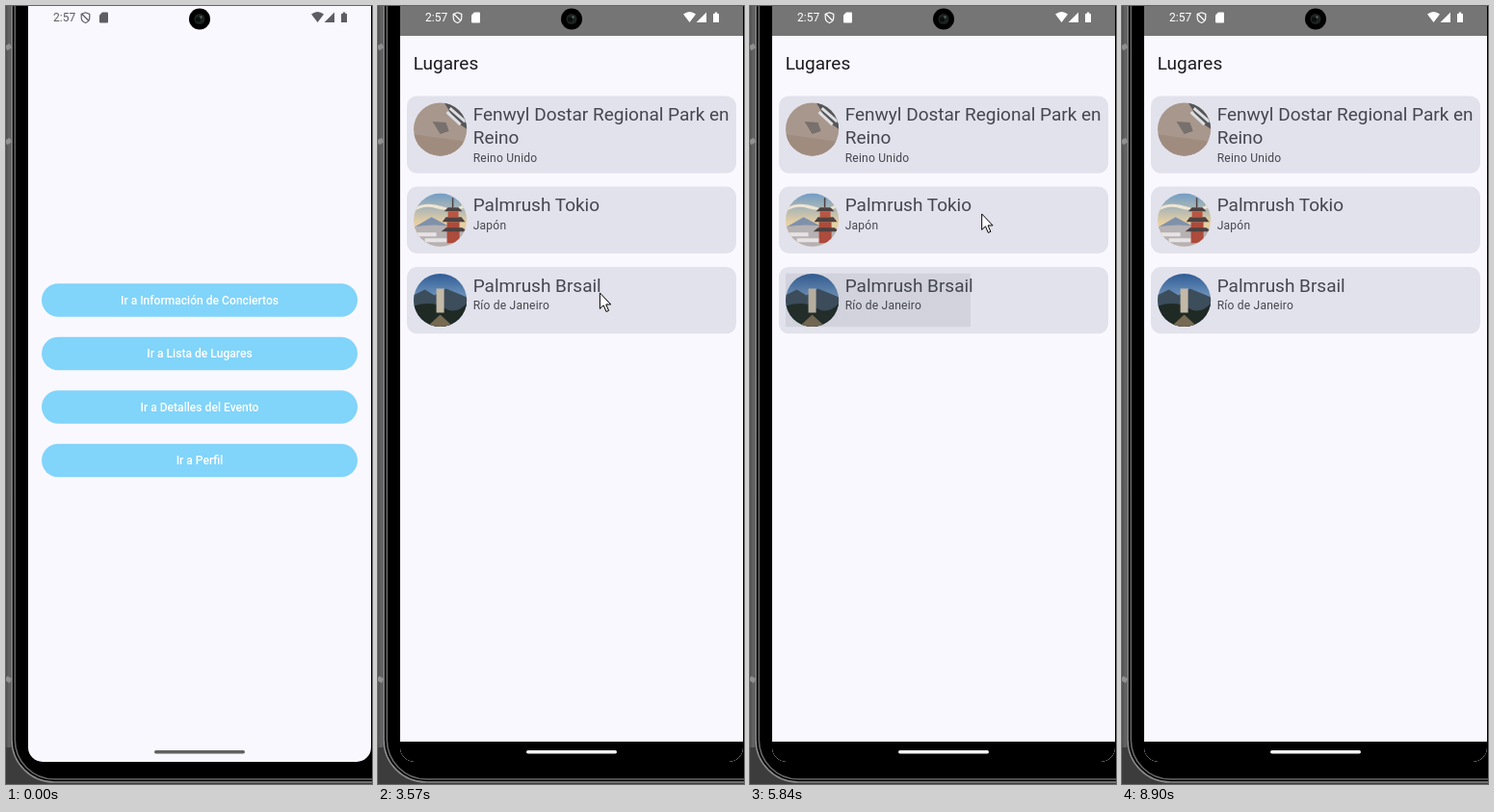
An HTML page for the animation above (9830 ms loop, 380 by 808 pixels).

```html
<!DOCTYPE html>
<html lang="es">
<head>
<meta charset="utf-8">
<style>
  html, body { margin: 0; width: 100%; height: 100%; overflow: hidden; background: #000; }
  svg { display: block; width: 380px; height: 808px; font-family: Roboto, sans-serif; font-size: 12.08px; }
  .title { font-size: 19px; }
  .sub { letter-spacing: .2px; }
  .label { font-weight: 500; fill: #fff; text-anchor: middle; }
</style>
</head>
<body>
<svg viewBox="0 0 380 808">
  <defs>
    <clipPath id="screen"><rect x="23" y="-30" width="356" height="815" rx="15"/></clipPath>
    <clipPath id="disc"><circle r="27.6"/></clipPath>
    <clipPath id="area0"><rect x="37" y="343.7" width="328" height="34.5" rx="17.25"/></clipPath>
    <clipPath id="area1"><rect x="37" y="100.3" width="326" height="67"/></clipPath>
    <clipPath id="area2"><rect x="37" y="194.5" width="192" height="55.5"/></clipPath>
    <clipPath id="area3"><rect x="37" y="277.8" width="192" height="55.5"/></clipPath>
    <radialGradient id="light"><stop offset=".55" stop-color="#fff" stop-opacity=".13"/><stop offset="1" stop-color="#fff" stop-opacity="0"/></radialGradient>
    <radialGradient id="dark"><stop offset=".55" stop-color="#3c4650" stop-opacity=".1"/><stop offset="1" stop-color="#3c4650" stop-opacity="0"/></radialGradient>
    <linearGradient id="metal"><stop stop-color="#505050"/><stop offset=".6" stop-color="#666"/><stop offset="1" stop-color="#444"/></linearGradient>
    <linearGradient id="dusk" x2="0" y2="1"><stop stop-color="#6f9cc6"/><stop offset=".55" stop-color="#e6cfa4"/></linearGradient>
    <linearGradient id="sky" x2="0" y2="1"><stop stop-color="#2f5c96"/><stop offset=".6" stop-color="#86a8c9"/></linearGradient>
  </defs>

  <!-- phone body -->
  <rect width="380" height="808" fill="#3c3c3c"/>
  <rect width="6" height="770" fill="url(#metal)"/>
  <g fill="none">
    <rect x="6" y="-60" width="450" height="866" rx="44" fill="#000" stroke="#8a8a8a" stroke-width="1.6"/>
    <rect x="9.3" y="-60" width="450" height="863" rx="41" stroke="#666" stroke-width="1.6"/>
    <path d="M0 44l5-3M0 142l5-3M0 698l5 3" stroke="#909090" stroke-width="5"/>
  </g>

  <g clip-path="url(#screen)">
    <rect x="23" y="-30" width="356" height="815" fill="#faf8ff"/>
    <g id="home"></g>
    <g id="places">
      <rect x="-40" width="460" height="785" fill="#faf8ff"/>
      <rect x="-40" width="460" height="31" fill="#757575"/>
      <rect x="-40" y="764" width="460" height="21"/>
      <text class="title" x="36.8" y="65.7" fill="#1a1b21">Lugares</text>
    </g>
  </g>

  <g id="bar" fill="currentColor">
    <text x="49" y="16.3">2:57</text>
    <path d="M82.5 6.8l4.3 1.7v3.2c0 2.800-1.800 4.900-4.300 5.800-2.500-.9-4.300-3-4.300-5.800V8.500zM79 8.500l7 7" fill="none" stroke="currentColor" stroke-width="1.2"/>
    <path d="M100 6.500h5q1 0 1 1v9q0 1-1 1h-7q-1 0-1-1v-7z"/>
    <path d="M317 8.600q6.500-5 13 0l-6.500 8.400zM341 6.500v10.500h-10.500zM348 8h1.700v-1.500h2.600V8h1.700v9h-6z"/>
    <rect id="pill" x="154" y="773" width="94" height="3.400" rx="1.700"/>
  </g>
  <circle cx="201" cy="13.500" r="11"/>
  <circle cx="201" cy="13.500" r="5.500" fill="#1d2322"/>
  <circle cx="199.500" cy="14" r="2.500" fill="#0b0e0e"/>
  <circle cx="202.500" cy="11.500" r="1.200" fill="#56645c"/>

  <g id="cursor">
    <circle id="press" r="15" fill="#f3f25c" opacity=".87"/>
    <path d="M.5 .5v16.500l3.800-3.600 2.800 6.600 2.600-1.100-2.800-6.400h5z" fill="#fff" stroke="#000"/>
  </g>
</svg>

<script>
const LOOP = 9830, STEP = 66.55, FIRST = 440;
const $ = id => document.getElementById(id);
const add = (parent, markup) => parent.insertAdjacentHTML('beforeend', markup);

['Información de Conciertos', 'Lista de Lugares', 'Detalles del Evento', 'Perfil'].forEach((name, i) => {
  const y = 288.2 + 55.5 * i;
  add($('home'), `<rect x="37" y="${y}" width="328" height="34.5" rx="17.25" fill="#81d4fa"/>
    <text class="label" x="201" y="${y + 21.4}">Ir a ${name}</text>`);
});

const photos = [
  `<path d="M-28-28h56v56h-56z" fill="#a8978c"/><path d="M-28 5l56 8v15h-56z" fill="#a08c7f"/>
   <path d="M-8-8L6-7 9 2 0 5z" fill="#77706d"/><path d="M4-28h24V0L16-8z" fill="#55565a"/>
   <path d="M10-22l16 14M7-18l14 13" stroke="#dedfe2" stroke-width="3"/>`,
  `<path d="M-28-28h56v56h-56z" fill="url(#dusk)"/><path d="M-28-12q14-8 30-2t26-6v7q-18 5-32 1t-24 4z" fill="#eee5d5"/>
   <path d="M-28 8L-9-3 12 8z" fill="#7f91aa"/><path d="M-28 7q28-4 56 2v19h-56z" fill="#b6b1b3"/>
   <path d="M-24 15h20M-16 21h25" stroke="#e7e3e4" stroke-width="4"/>
   <path d="M7 2h13v22H7z" fill="#ad4b3c"/><path d="M2 2l4-5h16l4 5zM4-9l4-4h11l4 4zM1 12l5-4h17l5 4z" fill="#4d4140"/>
   <path d="M8-9h11v6H8z" fill="#b95541"/><path d="M13-23v10" stroke="#4d4140" stroke-width="1.500"/>`,
  `<path d="M-28-28h56v56h-56z" fill="url(#sky)"/><path d="M-28-5l12-6 10 6 12-7 22 9v31h-56z" fill="#3c4d5c"/>
   <path d="M-28 6q20-6 32 2t24-5v25h-56z" fill="#202a25"/><path d="M-14 28l14-13 14 13z" fill="#776a52"/>
   <rect x="-4" y="-12" width="8" height="25" fill="#c3b9a7"/>`
];
const cards = [
  [93.5, 80.3, ['Fenwyl Dostar Regional Park en', 'Reino'], 'Reino Unido'],
  [187.6, 69.3, ['Palmrush Tokio'], 'Japón'],
  [270.9, 69.3, ['Palmrush Brsail'], 'Río de Janeiro']
];
cards.forEach(([y, h, lines, sub], i) => {
  const titles = lines.map((s, n) => `<text class="title" x="98.7" y="${y + 25.7 + 24.15 * n}">${s}</text>`).join('');
  add($('places'), `<g fill="#45464f"><rect x="30" y="${y}" width="342" height="${h}" rx="10.35" fill="#e2e2ec"/>
    <g transform="translate(64.6 ${y + 34.6})" clip-path="url(#disc)">${photos[i]}</g>
    ${titles}<text class="sub" x="98.7" y="${y + 20 + 24.15 * lines.length}">${sub}</text></g>`);
});

// [start, end, area, x, y]
const ripples = [
  [1600, 2300, 0, 234, 366], [3990, 4500, 1, 190, 126], [4640, 5300, 2, 205, 230],
  [5160, 5990, 3, 200, 314], [5900, 6220, 2, 242, 211], [6700, 7350, 1, 262, 133]
].map(([start, end, area, x, y]) => {
  const page = area ? $('places') : $('home');
  add(page, `<g clip-path="url(#area${area})"><circle cx="${x}" cy="${y}" fill="url(#${area ? 'dark' : 'light'})"/></g>`);
  return { start, end, dot: page.lastElementChild.firstElementChild };
});

// [time, x, y]
const path = [
  [440, 355, 486], [706, 254, 395], [905, 254, 395], [1370, 234, 366], [2600, 234, 366], [2890, 232, 451],
  [3365, 225, 322], [3505, 225, 322], [3567, 230, 298], [3833, 190, 126], [4250, 190, 126], [4540, 205, 230],
  [4720, 205, 230], [4900, 204, 284], [5030, 200, 314], [5400, 200, 314], [5850, 242, 211], [6300, 242, 211],
  [6425, 267, 131], [7150, 267, 131], [7490, 275, 600], [7565, 275, 600], [7830, 360, 763], [8095, 360, 763],
  [8290, 315, 730], [8700, 315, 730], [8840, 365, 771]
];
const presses = [[1560, 1700], [2860, 3360], [3960, 4090], [4560, 4690], [5020, 5160], [5960, 6090], [6560, 6690], [8280, 8350]];

const clamp = v => Math.max(0, Math.min(1, v));
const bezier = (a, b, c, d, u) => {
  const v = 1 - u;
  return a * v * v * v + 3 * b * v * v * u + 3 * c * v * u * u + d * u * u * u;
};

// Two joined curves: quick start, very slow end.
function slideEase(x) {
  const [xs, ys] = x < 1 / 6
    ? [[0, .05, .1333, 1 / 6], [0, 0, .06, .4]]
    : [[1 / 6, .2083, .25, 1], [.4, .82, 1, 1]];
  let lo = 0, hi = 1;
  for (let i = 0; i < 20; i++) {
    const mid = (lo + hi) / 2;
    if (bezier(...xs, mid) < x) lo = mid; else hi = mid;
  }
  return bezier(...ys, lo);
}

function cursorAt(t) {
  const i = path.findIndex(p => p[0] > t);
  if (i < 0) return path[path.length - 1].slice(1);
  if (!i) return path[0].slice(1);
  const [t0, x0, y0] = path[i - 1], [t1, x1, y1] = path[i];
  const k = (t - t0) / (t1 - t0);
  return [x0 + (x1 - x0) * k, y0 + (y1 - y0) * k];
}

function draw(now) {
  const t = FIRST + Math.floor((now % LOOP - FIRST) / STEP) * STEP;

  const slide = slideEase(clamp((t - 2235) / 450));
  $('home').setAttribute('transform', `translate(${-35.5 * slide})`);
  $('places').setAttribute('transform', `translate(${35.5 * (1 - slide)})`);
  $('places').setAttribute('opacity', clamp((t - 2285) / 83));
  const opened = t > 2300;
  $('bar').style.color = opened ? '#fff' : '#5d5d63';
  $('pill').setAttribute('fill', opened ? '#f2f2f2' : '#62625e');

  for (const { start, end, dot } of ripples) {
    const age = Math.max(0, t - start);
    dot.setAttribute('r', 40 + .0022 * age * age);
    dot.setAttribute('opacity', clamp(Math.min(age / 60, (end - t) / 150)));
  }

  $('cursor').setAttribute('transform', `translate(${cursorAt(t)})`);
  $('cursor').setAttribute('visibility', t >= FIRST && t < 8880 ? 'visible' : 'hidden');
  $('press').setAttribute('display', presses.some(([a, b]) => t >= a && t < b) ? 'inline' : 'none');
}

const origin = performance.now();
function tick() {
  draw(performance.now() - origin);
  requestAnimationFrame(tick);
}
tick();
</script>
</body>
</html>
```
